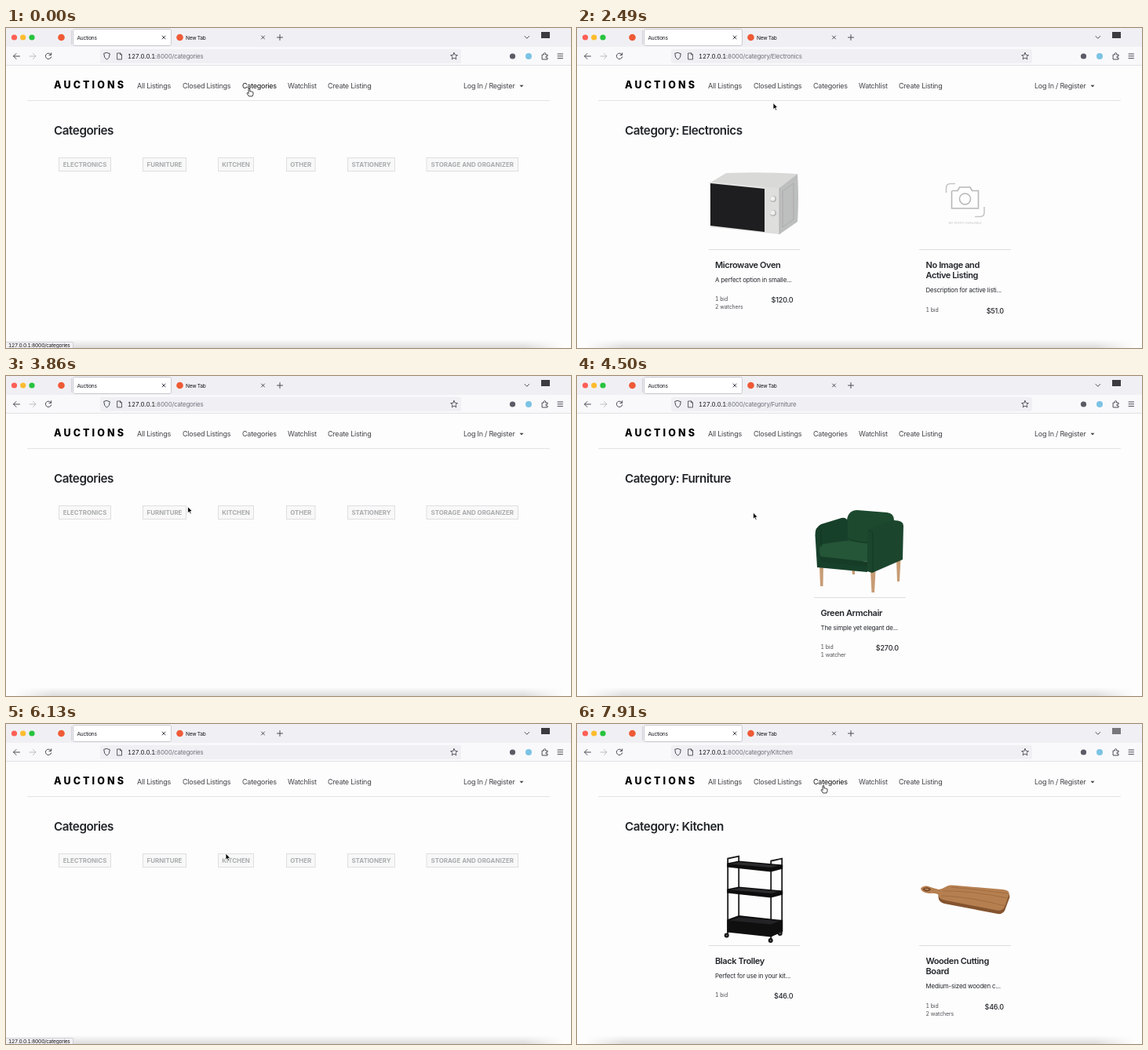
An HTML page for the animation above (8 s loop, 720 by 408 pixels).

```html
<!DOCTYPE html>
<html lang="en">
<head>
<meta charset="utf-8">
<title>Auctions</title>
<style>
html, body { margin: 0; width: 100%; height: 100%; overflow: hidden; background: #fefdfe; }
body { position: relative; font-family: Inter, "Open Sans", sans-serif; }
svg { position: absolute; left: 0; top: 0; }
text { fill: #212529; }
.ui, .url, .stat, #status { font-variant-numeric: tabular-nums; }
.ui { font-size: 6.6px; letter-spacing: -.04em; fill: #15141a; }
.url { font-size: 7.8px; letter-spacing: -.022em; fill: #6f6f7a; }
.url tspan { fill: #15141a; }
.brand { font-size: 12.5px; font-weight: 800; letter-spacing: 3.1px; fill: #000; }
.nav { font-size: 9px; letter-spacing: -.027em; fill: #414346; }
.nav.on { fill: #111; }
.head { font-size: 15.2px; font-weight: 600; letter-spacing: -.028em; }
.chip rect { fill: #f8f8f8; stroke: #dfdfe0; }
.chip text { font-size: 7.9px; font-weight: 700; fill: #a9abad; text-anchor: middle; }
.chip.down rect { fill: #e9e9ea; }
.title { font-size: 11px; font-weight: 600; letter-spacing: -.036em; }
.desc { font-size: 7.9px; letter-spacing: -.02em; }
.stat { font-size: 6.9px; letter-spacing: -.01em; fill: #4b4e51; }
.price { font-size: 9px; font-weight: 500; letter-spacing: -.02em; text-anchor: end; }
.icon { fill: none; stroke: #4a4a55; stroke-linecap: round; stroke-linejoin: round; }
#shade { position: absolute; left: 0; right: 0; bottom: 0; height: 11px;
  background: linear-gradient(#0000, #0002);
  mask-image: linear-gradient(90deg, #0000 10px, #000 60px, #000 660px, #0000 710px); }
#status { position: absolute; left: -1px; bottom: 0; height: 8px; padding: 0 3px; box-sizing: border-box;
  border: solid #cfcfd5; border-width: 1px 1px 0; border-radius: 0 2px 0 0; background: #f2f2f5;
  font-size: 6.6px; line-height: 8px; letter-spacing: -.04em; color: #15141a; white-space: nowrap; }
</style>
</head>
<body>
<svg id="stage" width="720" height="408" viewBox="0 0 720 408"></svg>
<div id="shade"></div>
<div id="status"></div>
<svg width="720" height="408" viewBox="0 0 720 408">
  <g id="cursor" stroke="#fff" stroke-width=".8" stroke-linejoin="round">
    <path id="arrow" fill="#000" d="M0 0V8.2L1.9 6.5L3.2 9.5L4.6 8.9L3.3 6H5.8Z"/>
    <path id="hand" fill="#fff" stroke="#111" d="M-.9 .9Q0 -.5 .9 .9V4L2.3 3.9L3.7 4.3L5 5V7.4L4 10H-.5L-2.8 6.6Q-3 5.2-1.7 5.7L-.9 6.5Z"/>
  </g>
</svg>
<script>
const $ = id => document.getElementById(id);
const text = (x, y, cls, s, more = '') => `<text x="${x}" y="${y}" class="${cls}" ${more}>${s}</text>`;
const shape = (fill, d) => `<path fill="${fill}" d="${d}"/>`;
const line = (color, width, d) => `<path fill="none" stroke="${color}" stroke-width="${width}" d="${d}"/>`;
const icon = (d, more = '') => `<path class="icon" d="${d}" ${more}/>`;
const dot = (x, y, r, fill) => `<circle cx="${x}" cy="${y}" r="${r}" fill="${fill}"/>`;
const cross = (x, y, r) => icon(`M${x - r} ${y - r}l${2 * r} ${2 * r}m0 ${-2 * r}l${-2 * r} ${2 * r}`);

const HOST = '127.0.0.1';
const LINKS = [[167, 211, 'All Listings'], [225, 287, 'Closed Listings'], [301, 345, 'Categories'],
  [359, 396, 'Watchlist'], [410, 466, 'Create Listing'], [583, 650, 'Log In / Register']];
const CHIPS = [[67.5, 133.5, 'ELECTRONICS'], [174.5, 229.5, 'FURNITURE'], [270.5, 315.5, 'KITCHEN'],
  [357.5, 394, 'OTHER'], [435.5, 495.5, 'STATIONERY'], [536, 652.5, 'STORAGE AND ORGANIZER']];

const art = {
  microwave:
    shape('#d9d9d8', 'M170 197L190 185Q236 183 281 186L259 205Z') +
    shape('#bdbebe', 'M258 204L281 186Q283 216 281 247L258 263Z') +
    shape('#dededd', 'M238 203L258 204V263L238 261Z') +
    shape('#e5e5e4', 'M169 196L239 203V261L170 254Z') +
    shape('#1e1d1f', 'M170 198L239 205V260L170 252Z') +
    line('#a4a5a6', .7, 'M262 208L276 198V244L262 254Z M258 204V263') +
    [218, 236].map(y => dot(250, y, 4, '#b6b7b8') + dot(249.3, y - .5, 3, '#efefee')).join(''),
  camera:
    line('#c6c6c6', 1.6, 'M470.5 210V204Q470.5 198.5 476 198.5H482 M519 228V235Q519 240.5 513.5 240.5H507') +
    line('#b8b8b8', 1.6, 'M478 207.5H485L487.5 203H501L503.5 207.5H511.5V230H477.5V207.5') +
    '<circle cx="494.5" cy="218" r="7" fill="none" stroke="#b8b8b8" stroke-width="1.6"/>' +
    text(494.5, 249.5, '', 'NO PHOTO AVAILABLE', 'font-size="3.9" text-anchor="middle" style="fill:#c4c4c4"'),
  chair:
    shape('#c79c74', 'M309 240H314L313.5 268H310Z M374 248H380.5L379 276H375.5Z M407 234H412.5L411 262H408Z M350 246H354V253H351Z') +
    shape('#1d4a2f', 'M344 183Q346 171 357 171L395 174Q404 175 404 184V205L372 220L344 214Z') +
    shape('#17402a', 'M303.5 203Q303 193 311 189L337 181Q344 180 345 186V215L310 221L370 238V250L306 244Z') +
    shape('#245637', 'M309 221Q308 216 315 214L343 210L372 214V237L314 233Q309 231 309 221Z') +
    shape('#163b27', 'M309 230L371 237V243L312 237Z') +
    shape('#1b462d', 'M370 205Q370 194 378 192L404 184Q416 184 416 191L415 234L376 251L370 249Z') +
    line('#12331f', .8, 'M377 250V205Q377 196 371 197 M311 218V198Q311 192 306 195 M346 207Q358 213 370 212'),
  trolley: '<g transform="translate(-.8 .6)">' +
    line('#1b1b1c', 1.8, 'M193 268V171L207 168V262 M248 274V174L262 171V265') +
    [178, 211].map(y => shape('#0d0d0e', `M192 ${y - 1}L207 ${y - 4}L263 ${y + 1}V${y + 6}L248 ${y + 10}L192 ${y + 4}Z`) +
      shape('#2b2b2d', `M195 ${y}L208 ${y - 2.5}L259 ${y + 2}L248 ${y + 4.5}Z`)).join('') +
    shape('#0f0f10', 'M192 249L207 243.5L263 249.5V264L248 271L192 265Z') +
    shape('#232325', 'M195 250L208 246L259 250.5L248 255Z') +
    [[191.5, 269], [247.5, 275.5], [259.5, 266.5]].map(([x, y]) => dot(x, y, 3, '#151516') + dot(x, y, 1, '#666')).join('') + '</g>',
  board:
    shape('#85542f', 'M460.5 217L550 216Q552 219 551 222L545 238Q542 243 536 242L468 229Q461 227 460.5 221Z') +
    shape('#b57f50', 'M438 210Q440 206 446 206.5Q453 209 461 211Q466 210 471 207Q475 205 481 205.8L543 211Q552 212 550.5 218L545 233Q542 239 535 237.5L468 224.5Q461 223 460.5 217.5Q457 215 449 216Q439 215 438 210Z') +
    line('#9a6539', .7, 'M466 213Q500 212 549 222 M464 219Q500 220 546 232 M477 208Q510 211 549 216') +
    line('#6e4326', 1.4, 'M441.5 210.5Q446 207 450 211Q446 215 441.5 210.5Z')
};

function card(x, picture, titles, desc, stats, price) {
  const shift = (titles.length - 1) * 13.5, left = x + 8.5;
  return art[picture] + line('#dcdddf', 1, `M${x} 282.5h117`) +
    titles.map((s, i) => text(left, 305.5 + i * 13.5, 'title', s)).join('') +
    text(left, 323.5 + shift, 'desc', desc + '...') +
    stats.map((s, i) => text(left, 348 + shift + i * 10, 'stat', s)).join('') +
    text(x + 108, 350 + shift, 'price', price);
}

const PAGES = {
  categories: text(61, 135.5, 'head', 'Categories') + CHIPS.map(([a, b, s]) =>
    `<g class="chip"><rect x="${a}" y="165.5" width="${b - a}" height="17"/>${text((a + b) / 2, 177, '', s)}</g>`).join(''),
  Electronics:
    card(167.5, 'microwave', ['Microwave Oven'], 'A perfect option in smalle', ['1 bid', '2 watchers'], '$120.0') +
    card(436, 'camera', ['No Image and', 'Active Listing'], 'Description for active listi', ['1 bid'], '$51.0'),
  Furniture:
    card(302, 'chair', ['Green Armchair'], 'The simple yet elegant de', ['1 bid', '1 watcher'], '$270.0'),
  Kitchen:
    card(167.5, 'trolley', ['Black Trolley'], 'Perfect for use in your kit', ['1 bid'], '$46.0') +
    card(436, 'board', ['Wooden Cutting', 'Board'], 'Medium-sized wooden c', ['1 bid', '2 watchers'], '$46.0')
};
const CARDS = { categories: [], Electronics: [167, 436], Furniture: [302], Kitchen: [167, 436] };
const pathOf = page => ':8000/' + (page === 'categories' ? page : 'category/' + page);

$('stage').innerHTML = `
  <rect width="720" height="24" fill="#f0f0f4"/>
  <rect y="24" width="720" height="23" fill="#f9f9fb"/>
  <path d="M0 47.5H720" stroke="#e2e2e6"/>
  ${dot(10.5, 12, 3.6, '#fe5f57') + dot(21.7, 12, 3.6, '#febc2e') + dot(33, 12, 3.6, '#28c33f')}
  ${dot(70.5, 12, 4.3, '#ee5a36') + dot(221.5, 12, 4.3, '#ee5a36')}
  <path d="M83.5 3V21" stroke="#cfcfd6"/>
  <rect x="85.5" y="1.5" width="125" height="21" rx="2" fill="#fff" stroke="#c9c9d0"/>
  <text id="tab" y="14.5" class="ui"></text>
  ${text(229, 14.5, 'ui', 'New Tab')}
  ${cross(201, 12, 2) + cross(327.5, 12, 2)}
  ${icon('M345.5 12h7m-3.5-3.5v7 M661 10.5l2.8 2.8l2.8-2.8')}
  <path id="badge" d="M682 5h11v8h-11z"/>
  ${icon('M17.5 36H9.5l3.5-3.5m-3.5 3.5l3.5 3.5')}
  ${icon('M30 36h8l-3.5-3.5m3.5 3.5l-3.5 3.5', 'style="stroke:#bdbdc4"')}
  <g id="reload">${icon('M57 33.5A3.7 3.7 0 1 0 57.7 36.8 M57.7 31.8V34.5H55')}</g>
  <g id="stop">${cross(54, 36, 3)}</g>
  <g id="wait">${icon('M92.5 8h5m-5 8h5 M93 8v2l4 4v2 M97 8v2l-4 4v2', 'stroke-width=".8"')}</g>
  <rect x="120" y="27" width="460" height="18" rx="2.5" fill="#f0f0f4"/>
  ${icon('M128.5 31.5l3.8 1.3q0 5.5-3.8 7.5q-3.8-2-3.8-7.5z')}
  ${icon('M142 32h3.5l2 2v6h-5.5z M145.5 32v2h2', 'stroke-width=".9"')}
  ${icon('M571 31.5l1.3 2.9l3.1 .3l-2.4 2.1l.8 3.1l-2.8-1.7l-2.8 1.7l.8-3.1l-2.4-2.1l3.1-.3z', 'stroke-width=".9"')}
  <text id="url" x="155" y="38.8" class="url"></text>
  ${dot(645.5, 36, 3.6, '#5b5b66') + dot(666, 36, 4, '#7cc3e4')}
  ${icon('M683.5 34h2q-.5-2.5 1-2.5t1 2.5h2.5v2q-2.3-.3-2.3 1t2.3 1v2h-6.5z M703 33h6.5m-6.5 2.8h6.5m-6.5 2.8h6.5')}
  ${text(61, 76.6, 'brand', 'AUCTIONS')}
  ${LINKS.map(([x, , s]) => text(x, 77, 'nav', s)).join('')}
  <path d="M654.5 72.7h5l-2.5 2.7z" fill="#414346"/>
  <path d="M27 92.5H693" stroke="#e2e3e6"/>
  ${Object.entries(PAGES).map(([name, body]) => `<g id="${name}">${
    name === 'categories' ? '' : text(61, 135.5, 'head', 'Category: ' + name)}${body}</g>`).join('')}`;

const VISITS = [[-1000, 'categories'], [1210, 'Electronics'], [3180, 'categories'],
  [4280, 'Furniture'], [5640, 'categories'], [6700, 'Kitchen']];
const MOVES = [[160, 310, 77], [640, 113, 171], [1940, 113, 171], [2740, 291, 73], [2830, 322, 72],
  [3260, 322, 72], [3980, 224.5, 174], [4850, 224.5, 174], [5420, 336, 72], [5740, 336, 72],
  [6130, 280, 165], [6420, 282, 169], [7410, 282, 169], [7910, 314, 78]];
const HINTS = [[-200, 560, pathOf('categories')], [780, 1210, pathOf('Electronics')],
  [2960, 3180, pathOf('categories')], [3180, 3400, ''], [4070, 4280, pathOf('Furniture')],
  [5640, 6230, pathOf('categories')], [6560, 6700, pathOf('Kitchen')], [6780, 7800, ':8000/listing/7']];
const PRESSES = [[1030, 0], [4180, 1], [6620, 2]];

const clamp = v => Math.min(1, Math.max(0, v));
const ease = p => p * p * (3 - 2 * p);
const show = (id, on) => $(id).style.display = on ? '' : 'none';

function pointer(t) {
  const i = MOVES.findIndex(m => m[0] > t);
  if (i < 1) return MOVES.at(i).slice(1);
  const [a, x, y] = MOVES[i - 1], [b, u, v] = MOVES[i], p = ease((t - a) / (b - a));
  return [x + (u - x) * p, y + (v - y) * p];
}

function draw(t) {
  const [since, page] = VISITS.findLast(v => v[0] <= t), age = t - since;
  for (const name in PAGES) show(name, name === page);

  const loading = age < 60, path = pathOf(page);
  show('wait', loading);
  show('stop', loading);
  show('reload', !loading);
  $('tab').textContent = loading ? HOST + path : 'Auctions';
  $('tab').setAttribute('x', age < 135 ? 102 : 90.5);
  $('url').innerHTML = `<tspan>${HOST}</tspan>${path}`;
  $('badge').setAttribute('fill', t > 7800 ? '#77777c' : '#3b3b40');

  const [x, y] = pointer(t);
  const link = y > 63 && y < 85 ? LINKS.findIndex(([a, b]) => x > a - 7 && x < b + 7) : -1;
  const chip = page === 'categories' && y > 165.5 && y < 182.5 && CHIPS.some(([a, b]) => x > a && x < b);
  const onCard = y > 166 && CARDS[page].some(a => x > a && x < a + 117);
  const over = link >= 0 || chip || onCard;
  show('hand', over);
  show('arrow', !over);
  $('cursor').setAttribute('transform', `translate(${x} ${y})`);
  document.querySelectorAll('.nav').forEach((el, i) => el.classList.toggle('on', i === link && !loading));
  document.querySelectorAll('.chip').forEach((el, i) =>
    el.classList.toggle('down', PRESSES.some(([a, n]) => n === i && t >= a && t < a + 180)));

  const hint = HINTS.findLast(h => h[0] <= t), status = $('status');
  status.textContent = HOST + hint[2];
  status.style.minWidth = hint[2] ? 0 : '137px';
  const fadeIn = hint[2] ? clamp((t - hint[0]) / 80) : 1;
  status.style.opacity = Math.min(fadeIn, clamp(1 - (t - hint[1]) / 100));
}

const start = performance.now();
(function tick() {
  draw((performance.now() - start) % 8000);
  requestAnimationFrame(tick);
})();
</script>
</body>
</html>
```
